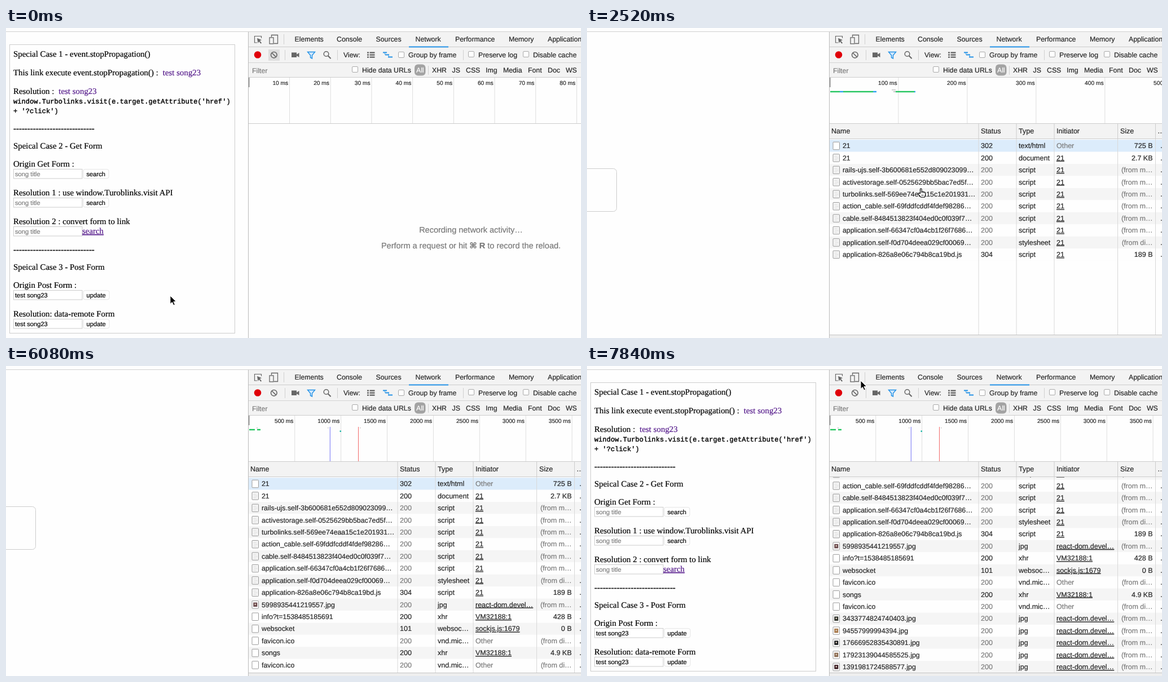
An HTML page for the animation above (7.99 s loop, 1019 by 550 pixels).

```html
<!DOCTYPE html>
<html lang="en">
<head>
<meta charset="utf-8">
<title>Network panel demo</title>
<style>
  html, body { margin: 0; width: 100%; height: 100%; overflow: hidden; background: #fefefe; }
  svg { display: block; width: 1019px; height: 550px; }
  text {
    white-space: pre; text-rendering: geometricPrecision;
    color: #262626; fill: currentColor; stroke: currentColor; stroke-width: .2px;
  }
  .ui { font: 12.3px "Liberation Sans", Arial, sans-serif; }
  .cell { font: 12.5px "Liberation Sans", Arial, sans-serif; }
  .name { font-size: 12.35px; }
  .tick { font: 10.2px "Liberation Sans", Arial, sans-serif; }
  .hint { font: 14.5px "Liberation Sans", "DejaVu Sans", sans-serif; color: #777; }
  .page { font: 14.9px "Liberation Serif", Times, serif; color: #000; }
  .code { font: 12.1px "Liberation Mono", Courier, monospace; color: #000; stroke-width: .4px; }
  .field { font: 11.2px "Liberation Sans", Arial, sans-serif; color: #000; }
  .visited { color: #551a8b; }
  .dim { color: #7c7c7c; }
  .white { color: #fff; }
  .link { text-decoration: underline; }
  .end { text-anchor: end; }
  .mid { text-anchor: middle; }
</style>
</head>
<body>
<svg id="stage" viewBox="0 0 1019 550" xmlns="http://www.w3.org/2000/svg"></svg>
<script>
const LOOP = 7990;
const PRESS = 1480, REQUEST = 1630, REPLY = 1780, LEAVE = 2220, ASSETS = 2810, SONGS = 6080, BACK = 6230, THUMBS = 6520;

const text = (x, y, cls, s) => `<text x="${x}" y="${y}" class="${cls}">${s}</text>`;
const rect = (x, y, w, h, fill, extra = '') =>
  `<rect x="${x}" y="${y}" width="${w}" height="${h}" fill="${fill}" ${extra}/>`;
const path = (d, stroke, width = 1, fill = 'none') =>
  `<path d="${d}" stroke="${stroke}" stroke-width="${width}" fill="${fill}"/>`;
const vline = (x, y1, y2, color) => path(`M${x} ${y1}V${y2}`, color);
const hline = (y, x1, x2, color) => path(`M${x1} ${y}H${x2}`, color);
const during = (from, to, body) => `<g data-from="${from}" data-to="${to}">${body}</g>`;

// Left page
function field(y, value, cls, button) {
  let out = rect(13.5, y + .5, 121.5, 16.5, '#fff', 'stroke="#ccc"') + text(16, y + 12.7, 'field ' + cls, value);
  if (button) {
    out += rect(137, y + .8, button === 'search' ? 45 : 46, 16, '#fff', 'rx="3" stroke="#ddd" stroke-width=".8"')
      + text(142.5, y + 12.7, 'field', button);
  }
  return out;
}

function page() {
  const dashes = '-'.repeat(29);
  const lines = [
    [50.5, 'Special Case 1 - event.stopPropagation()'],
    [84, 'This link execute event.stopPropagation() :'],
    [117, 'Resolution :'],
    [183, dashes],
    [214, 'Speical Case 2 - Get Form'],
    [246, 'Origin Get Form :'],
    [297, 'Resolution 1 : use window.Turoblinks.visit API'],
    [348, 'Resolution 2 : convert form to link'],
    [398, dashes],
    [429, 'Speical Case 3 - Post Form'],
    [461, 'Origin Post Form :'],
    [512, 'Resolution: data-remote Form']
  ];
  const pressed = rect(137, 465.8, 46, 16, '#4a94f5', 'rx="3"') + text(142.5, 477.7, 'field white', 'update');
  return rect(6.5, 29.5, 399, 512, 'none', 'stroke="#ccc"')
    + lines.map(([y, s]) => text(13, y, 'page', s)).join('')
    + text(277.8, 84, 'page visited', 'test song23')
    + text(93.3, 117, 'page visited', 'test song23')
    + text(13, 134, 'code', "window.Turbolinks.visit(e.target.getAttribute('href')")
    + text(13, 151, 'code', "+ '?click')")
    + field(250, 'song title', 'dim', 'search')
    + field(301, 'song title', 'dim', 'search')
    + field(352, 'song title', 'dim')
    + text(135, 365, 'page visited link', 'search')
    + field(465, 'test song23', '', 'update')
    + field(516, 'test song23', '', 'update')
    + during(PRESS, REQUEST, pressed);
}

// Toolbars
function toolbar() {
  const ink = '#666', blue = '#2492e6';
  const row = (y, items) => items.map(([x, s]) => text(x, y, 'ui', s)).join('');
  const box = (x, y) => rect(x + .5, y + .5, 10, 10, '#fff', 'rx="1.5" stroke="#aaa"');
  const dividers = [[492.5, 11, 29], [494.5, 39, 57], [587.5, 39, 57], [810.5, 39, 57], [748.5, 67, 83]];
  const icons =
    path('M445 26H440.5V14.5H452.5V18', ink, 1.2) + path('M445 18l8 3.3-3.2 1.5 3.2 3.6-1.5 1.3-3.2-3.7-1.8 3z', 'none', 0, ink)
    + path('M470.5 16V12.5H481.5V27.5H475', ink, 1.3) + rect(467, 17, 7, 11, '#f3f3f3', 'stroke="#666" stroke-width="1.3"')
    + '<circle cx="446" cy="47.5" r="6.3" fill="#e00009"/>'
    + during(0, REQUEST, rect(465, 38, 20, 20, '#dedede'))
    + '<circle cx="474.8" cy="47.8" r="5.3" fill="none" stroke="#666" stroke-width="1.6"/>' + path('M471 44l7.6 7.6', ink, 1.6)
    + rect(506, 43.5, 9, 8.5, ink) + path('M515 47l4.5-3v8l-4.5-3z', 'none', 0, ink)
    + path('M534.5 42.5H547.5L542.5 48.5V54L539.5 52.5V48.5z', blue, 1.4, '#d3e8fa')
    + '<circle cx="567.5" cy="46" r="4.3" fill="none" stroke="#666" stroke-width="1.5"/>' + path('M570.6 49.2l5 5', ink, 2)
    + [43.5, 47.5, 51.5].map(y => rect(640, y - 1, 3, 2.4, ink) + rect(644.5, y - 1, 9, 2.4, ink)).join('')
    + path('M668 43.5h7M672 47.5h7M677 51.5h8', blue, 2) + path('M671.5 43v4.5M678 47v4.5', blue, .8);
  return rect(430, 7, 589, 80, '#f3f3f3')
    + hline(6.5, 0, 1019, '#d0d0d0') + hline(33.5, 430, 1019, '#ccc')
    + hline(61.5, 430, 1019, '#d4d4d4') + hline(87.5, 430, 1019, '#ccc')
    + rect(714, 32.5, 70, 2, blue)
    + dividers.map(([x, y1, y2]) => vline(x, y1, y2, '#d0d0d0')).join('')
    + icons
    + row(24.4, [[511.5, 'Elements'], [586, 'Console'], [655.5, 'Sources'], [725.5, 'Network'], [796, 'Performance'], [891, 'Memory'], [960, 'Application']])
    + row(52, [[598, 'View:'], [713, 'Group by frame'], [837, 'Preserve log'], [934, 'Disable cache']])
    + box(695, 42) + box(819, 41) + box(916, 41) + box(613, 68)
    + text(436, 79.5, 'ui dim', 'Filter')
    + rect(724, 64.5, 19.5, 20, '#a3a3a3', 'rx="6"') + text(727, 79, 'ui white', 'All')
    + row(79, [[631, 'Hide data URLs'], [755, 'XHR'], [790.5, 'JS'], [815, 'CSS'], [850, 'Img'], [881, 'Media'], [925, 'Font'], [960, 'Doc'], [992, 'WS']]);
}

// Overview timeline
function scale(gap, unit) {
  let out = '';
  for (let i = 1; i * gap < 640; i++) {
    const x = 429.8 + i * gap;
    out += vline(x, 88, 169, '#dedede') + text(x - 2.3, 101, 'tick end', i * unit + ' ms');
  }
  return out;
}

function timeline() {
  const green = '#22c55e', blue = '#2b9ff0', teal = '#1fb8a8', grey = '#c4c4c4';
  const bar = (x1, x2, c, y = 111.8, h = 2.4) => rect(x1, y, x2 - x1, h, c);
  const mark = (x, c) => vline(x, 108, 169, c);
  return rect(430, 88, 589, 82, '#fefefe')
    + during(0, LEAVE, scale(72.7, 10))
    + during(LEAVE, ASSETS, scale(122, 100))
    + during(ASSETS, SONGS, scale(124.9, 200))
    + during(SONGS, LOOP, scale(81.9, 500))
    + during(REQUEST, LEAVE, bar(431, 439, grey, 112.2, 1.3) + bar(439, 547, green) + bar(547, 568, blue))
    + during(REPLY, LEAVE, bar(568, 577, grey, 112.2, 1.3) + bar(577, 884, green) + bar(884, 923, blue))
    + during(LEAVE, ASSETS, bar(431, 448, green) + bar(448, 454, blue) + bar(454, 507, green) + bar(507, 513, blue)
      + bar(540, 547, grey, 109, 1.5) + bar(543, 547, grey, 112, 2) + bar(547, 580, green) + bar(580, 582, blue))
    + during(ASSETS, SONGS, bar(431, 470, green) + bar(470, 473, blue) + bar(486, 490, grey, 109, 2) + bar(489, 508, green)
      + bar(965, 966.5, grey, 109, 1.5) + mark(982.5, '#7272f5'))
    + during(SONGS, LOOP, bar(431, 441, green) + bar(445, 451, green) + bar(444, 446, grey, 109, 1.5)
      + bar(570, 571.5, grey, 109, 1.5) + bar(627, 628.5, grey, 109, 1.5) + bar(591.5, 594, teal, 114.5, 2.5)
      + mark(574.3, '#7272f5') + mark(624.5, '#f26a6a'))
    + rect(429.5, 88, 2, 17, '#8a8a8a')
    + hline(169.5, 430, 1019, '#ccc');
}

// Request table
const ROW = 21.43, TOP = 198.3, SCROLL = 103.7;
const COLS = [694, 761, 828, 940.5, 1007.5];
const asset = (name, type = 'script', size = '(from m…') => [LEAVE, name, '~200', type, '21', size];
const jpg = (name, at = BACK) => [at, name + '.jpg', '~200', 'jpg', 'react-dom.devel…', '(from m…'];
const favicon = at => [at, 'favicon.ico', '~200', 'vnd.mic…', 'Other', '(from di…'];
const requests = [
  [REQUEST, '21', '302', 'text/html', 'Other', '725 B'],
  [REPLY, '21', '200', 'document', '21', '2.7 KB'],
  asset('rails-ujs.self-3b600681e552d809023099…'),
  asset('activestorage.self-0525629bb5bac7ed5f…'),
  asset('turbolinks.self-569ee74eaa15c1e201931…'),
  asset('action_cable.self-69fddfcddf4fdef98286…'),
  asset('cable.self-8484513823f404ed0c0f039f7…'),
  asset('application.self-66347cf0a4cb1f26f7686…'),
  asset('application.self-f0d704deea029cf00069…', 'stylesheet', '(from di…'),
  [LEAVE, 'application-826a8e06c794b8ca19bd.js', '304', 'script', '21', '189 B'],
  jpg('5998935441219557', ASSETS),
  [ASSETS, 'info?t=1538485185691', '200', 'xhr', 'VM32188:1', '428 B'],
  [ASSETS, 'websocket', '101', 'websoc…', 'sockjs.js:1679', '0 B'],
  favicon(ASSETS),
  [SONGS, 'songs', '200', 'xhr', 'VM32188:1', '4.9 KB'],
  favicon(SONGS),
  jpg('3433774824740403'),
  jpg('94557999994394'),
  jpg('17666952835430891'),
  jpg('17923139044585525'),
  jpg('1391981724588577')
];
const thumbs = { 10: '#6b4a4e', 16: '#2b3029', 17: '#a8794a', 18: '#17191c', 19: '#8a6a4f', 20: '#3b1d24' };

function request([at, name, status, type, from, size], i) {
  const y = TOP + i * ROW, base = y + 15;
  const cached = status[0] === '~';
  const fill = i === 0 ? '#dcecfb' : i % 2 ? '#fefefe' : '#f5f5f5';
  const lined = /script|document|stylesheet/.test(type);
  let out = rect(430, y, 589, ROW, fill)
    + rect(436, y + 4, 11.5, 13.5, lined ? '#f4f4f4' : '#fff', 'rx="1" stroke="#9a9a9a"');
  if (lined) out += path(`M438.5 ${y + 8}h5M439.5 ${y + 11}h6M438.5 ${y + 14}h5`, '#dcdcdc');
  if (thumbs[i]) {
    out += during(at === BACK ? THUMBS : at, LOOP,
      rect(438.3, y + 7, 7, 7.5, thumbs[i]) + rect(440.5, y + 9, 2.5, 2.5, '#d8c8b8'));
  }
  out += text(453, base, 'cell name', name)
    + text(698, base, cached ? 'cell dim' : 'cell', status.replace('~', ''))
    + text(765, base, 'cell', type)
    + text(832, base, from === 'Other' ? 'cell dim' : 'cell link', from)
    + text(1002.5, base, cached ? 'cell end dim' : 'cell end', size)
    + text(1015.5, base, 'cell', '…');
  return during(at, LOOP, out);
}

function table() {
  const heads = [[433, 'Name'], [698, 'Status'], [765, 'Type'], [832, 'Initiator'], [945, 'Size'], [1011, '…']];
  return rect(430, 170, 589, 380, '#fefefe')
    + `<clipPath id="body"><rect x="430" y="197" width="589" height="347"/></clipPath>
       <g clip-path="url(#body)"><g id="rows">${requests.map(request).join('')}</g></g>`
    + rect(430, 170, 589, 26, '#f3f3f3') + hline(196.5, 430, 1019, '#ccc')
    + heads.map(([x, s]) => text(x, 187.2, 'cell', s)).join('')
    + COLS.map(x => vline(x, 170, 196, '#ccc') + vline(x, 197, 544, '#d8d8d8')).join('')
    + rect(430, 545, 589, 5, '#eee') + hline(544.5, 430, 1019, '#c4c4c4');
}

const hint = text(824, 363, 'hint mid', 'Recording network activity…')
  + text(824, 391, 'hint mid', 'Perform a request or hit <tspan font-weight="bold">⌘ R</tspan> to record the reload.');

// Pointer: time, x, y; a lone time hides it
const track = [
  [0, 291, 475], [600, 283, 475], [750, 254, 474], [890, 214, 473], [1030, 181, 472], [1180, 168, 471],
  [2220, 250, 425], [2370, 440, 345], [2520, 586, 284], [2660, 648, 250], [2810, 660, 222], [2960, 640, 205],
  [3260, 700, 200], [3410, 880, 194], [3550, 1004, 182], [3700, 760, 190], [3850, 560, 206], [4000, 460, 222],
  [4140, 434, 257], [4290, 436, 238], [4440, 682, 231], [4590, 975, 223], [4890, 1004, 224], [5040, 560, 224],
  [5190, 2, 224], [5330], [6520, 22, 480], [6670, 175, 428], [6810, 407, 301], [6960, 682, 238],
  [7110, 610, 120], [7250, 530, 30], [7400, 470, 60], [7540, 445, 169], [7690, 494, 8], [7840, 485, 26]
];
const arrow = path('M0 0V14.6L3.4 11.4 6 17 8.4 15.9 5.9 10.5H10.5z', '#fff', 1, '#000');
const hand = path('M4.5 9.5V2a1.3 1.3 0 0 1 2.6 0V6.5q1.4-1.2 2.4.3 1.5-.8 2.2.5 1.9-.5 2 1.5V11.5L12.3 16.3H5.8L1 10.5q-.5-1.7 1.3-1.6z', '#000', 1.1, '#fff')
  + path('M7.1 6.5V9M9.5 7V9M11.7 7.5V9.3M7.5 11.5V14M9.6 11.5V14', '#000', .8);

const stage = document.getElementById('stage');
stage.innerHTML = rect(0, 0, 1019, 550, '#fefefe')
  + during(0, LEAVE, page())
  + during(LEAVE, BACK, rect(-12, 249.5, 64.5, 76, '#fefefe', 'rx="6" stroke="#ccc"'))
  + during(BACK, LOOP, page())
  + toolbar() + timeline()
  + during(0, REQUEST, hint)
  + during(REQUEST, LOOP, table())
  + vline(429.5, 7, 550, '#bbb')
  + `<g id="pointer"><g id="arrow">${arrow}</g><g id="hand">${hand}</g></g>`;

const timed = [...stage.querySelectorAll('[data-from]')].map(el => ({ el, from: +el.dataset.from, to: +el.dataset.to }));
const part = id => document.getElementById(id);
const show = (el, on) => { el.style.display = on ? '' : 'none'; };

function draw(t) {
  for (const { el, from, to } of timed) show(el, t >= from && t < to);
  part('rows').setAttribute('transform', `translate(0 ${t >= BACK ? -SCROLL : 0})`);
  const [, x, y] = track.findLast(step => step[0] <= t);
  const pointing = t >= 2370 && t < THUMBS;
  show(part('pointer'), x !== undefined);
  show(part('arrow'), !pointing);
  show(part('hand'), pointing);
  if (x !== undefined) part('pointer').setAttribute('transform', `translate(${x} ${y})`);
}

const start = performance.now();
function tick() {
  draw((performance.now() - start) % LOOP);
  requestAnimationFrame(tick);
}
tick();
</script>
</body>
</html>
```
